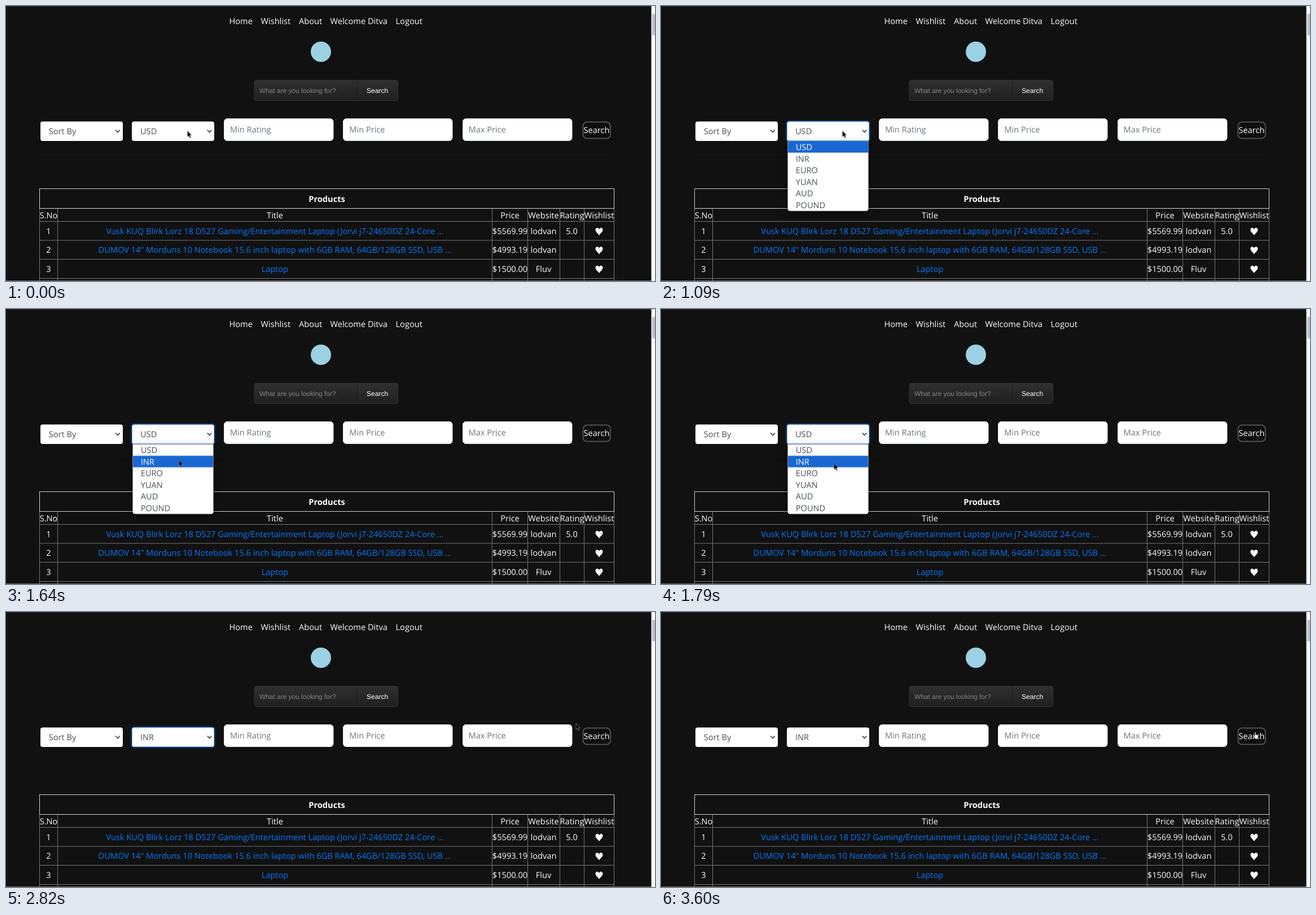
Recreate the animation shown at these times as an HTML page. Size 1150 by 487 pixels, loop 8 s.

```html
<!DOCTYPE html>
<html lang="en">
<head>
<meta charset="utf-8">
<title>Product search</title>
<style>
  html, body { margin: 0; width: 100%; height: 100%; overflow: hidden; background: #111; }
  svg { display: block; }
  text { font: 14.6px "Open Sans", sans-serif; fill: #fff; white-space: pre; text-rendering: geometricPrecision; }
  .mid text, text.mid { text-anchor: middle; }
  .bold { font-weight: 700; }
  .link { fill: #057aff; }
  .field { fill: #fff; }
  .hint rect { stroke: #dfe3e7; }
  .hint text { fill: #6c757d; }
  .value { fill: #495057; }
  .bar text { font-family: "Liberation Sans", Arial, sans-serif; font-size: 12.1px; }
  .bar .ask { font-size: 11.9px; fill: #858585; }
  .grid { fill: none; stroke: #777; }
  .head { fill: none; stroke: #d2d2d2; }

  /* Every change is a hard cut on an 8 s loop */
  .step { animation: 8s step-end infinite; }
  .menu { animation-name: menu; filter: drop-shadow(0 5px 7px rgba(0, 0, 0, .45)); }
  .menu text { fill: #495057; }
  .mark { fill: #1967d2; animation-name: mark; }
  .menu .usd { animation-name: usd; }
  .menu .inr { animation-name: inr; }
  .before { animation-name: before; }
  .after { animation-name: after; }
  .focus { animation-name: focus; }
  .arrow { animation-name: arrow; }
  .beam { animation-name: beam; }
  .hand { animation-name: hand; }

  @keyframes menu {
    0%, 29.625% { visibility: hidden; }
    11.75% { visibility: visible; }
    100% { visibility: hidden; }
  }
  @keyframes mark {
    0% { transform: none; }
    20.5%, 100% { transform: translateY(20.6px); }
  }
  @keyframes usd {
    0% { fill: #fff; }
    20.5%, 100% { fill: #495057; }
  }
  @keyframes inr {
    0% { fill: #495057; }
    20.5%, 100% { fill: #fff; }
  }
  @keyframes before {
    0% { opacity: 1; }
    29.625%, 100% { opacity: 0; }
  }
  @keyframes after {
    0% { opacity: 0; }
    29.625%, 100% { opacity: 1; }
  }
  @keyframes focus {
    0% { opacity: 0; }
    13.625% { opacity: 1; }
    43.5% { opacity: .5; }
    45%, 100% { opacity: 0; }
  }
  @keyframes arrow {
    0% { transform: translate(321.5px, 221px); opacity: 1; }
    19% { transform: translate(306.5px, 251.5px); opacity: 1; }
    20.5% { transform: translate(306.5px, 267.5px); opacity: 1; }
    22.375% { transform: translate(306.5px, 273.5px); opacity: 1; }
    31.5% { transform: translate(419.5px, 275.5px); opacity: 1; }
    33.375% { opacity: 0; }
    35.25% { transform: translate(1010px, 197px); opacity: 1; }
    36.75%, 100% { opacity: 0; }
  }
  @keyframes beam {
    0%, 35.25%, 100% { opacity: 0; }
    33.375% { opacity: 1; }
  }
  @keyframes hand {
    0% { opacity: 0; }
    36.75% { transform: translate(1037px, 206px); opacity: 1; }
    38.25% { transform: translate(1046px, 210px); opacity: 1; }
    39.75%, 100% { transform: translate(1049.5px, 212px); opacity: 1; }
  }
</style>
</head>
<body>
<svg width="1150" height="487" viewBox="0 0 1150 487">
  <defs>
    <linearGradient id="shade" x2="0" y2="1">
      <stop stop-color="#303030"/>
      <stop offset="1" stop-color="#1f1f1f"/>
    </linearGradient>
    <path id="chevron" d="M-3.8-2 0 2 3.8-2" fill="none" stroke="#343a40" stroke-width="1.6"/>
    <path id="heart" fill="#fff" d="M0 7.2C-1.500 4-6.500 1.500-6.500-2.700C-6.500-7.200-1.200-7.400 0-3.800C1.200-7.400 6.500-7.200 6.500-2.700C6.500 1.500 1.500 4 0 7.200Z"/>
  </defs>

  <rect width="1150" height="487" fill="#111"/>
  <path d="M0 .5H1144" stroke="#2e2e2e"/>
  <path d="M0 486.5H1144" stroke="#666"/>
  <rect x="1143.500" width="6.500" height="487" fill="#fafafa"/>
  <rect x="1145" y="14" width="5" height="38" fill="#c1c1c1"/>

  <g class="nav">
    <text x="395.500" y="32">Home</text>
    <text x="451.500" y="32">Wishlist</text>
    <text x="519" y="32">About</text>
    <text x="574.500" y="32">Welcome Ditva</text>
    <text x="690.500" y="32">Logout</text>
  </g>

  <circle cx="558" cy="81" r="18" fill="#9bd1e2"/>

  <g class="bar">
    <rect x="440" y="131.500" width="254.500" height="36" rx="4" fill="url(#shade)" stroke="#353535"/>
    <path d="M622.500 132V167" stroke="#1c1c1c"/>
    <text class="ask" x="449" y="153.500">What are you looking for?</text>
    <text class="mid" x="658.200" y="154.300">Search</text>
  </g>

  <rect class="field" x="61" y="204.500" width="146" height="34.500" rx="4"/>
  <text class="value" x="75.800" y="227.300">Sort By</text>
  <use href="#chevron" x="198" y="221.500"/>

  <rect class="step focus" x="220.500" y="202" width="151" height="39.500" rx="6" fill="#0d2c4d"/>
  <rect class="field" x="223" y="204.500" width="146" height="34.500" rx="4"/>
  <rect class="step focus" x="223.500" y="205" width="145" height="33.500" rx="3.500" fill="none" stroke="#80bdff"/>
  <text class="value step before" x="238" y="227.300">USD</text>
  <text class="value step after" x="238" y="227.300">INR</text>
  <use href="#chevron" x="360.500" y="221.500"/>

  <g class="hint">
    <rect class="field" x="386.500" y="199.500" width="193.500" height="39" rx="5.500"/>
    <rect class="field" x="597.500" y="199.500" width="193.500" height="39" rx="5.500"/>
    <rect class="field" x="809.500" y="199.500" width="193.500" height="39" rx="5.500"/>
    <text x="397" y="224.300">Min Rating</text>
    <text x="608.300" y="224.300">Min Price</text>
    <text x="819.500" y="224.300">Max Price</text>
  </g>

  <rect x="1022.500" y="205.500" width="48.500" height="29" rx="7" fill="#0e0e0e" stroke="#505050" stroke-width="2"/>
  <text class="mid" x="1046.500" y="224.500">Search</text>

  <path d="M61 268.500H1072" stroke="#0b0b0b"/>

  <path class="grid" d="M59.500 359V487M91.500 359V487M861.500 359V487M924.500 359V487M981.500 359V487M1024.500 359V487M1077.500 359V487
    M59.500 381.500H1078M59.500 415H1078M59.500 448.500H1078M59.500 482.500H1078"/>
  <rect class="head" x="59.500" y="323.500" width="1018" height="35"/>

  <g class="mid">
    <text class="bold" x="568.500" y="346.500">Products</text>

    <text x="75.500" y="375.500">S.No</text>
    <text x="476.500" y="375.500">Title</text>
    <text x="893" y="375.500">Price</text>
    <text x="952.500" y="375.500">Website</text>
    <text x="1003" y="375.500">Rating</text>
    <text x="1051" y="375.500">Wishlist</text>

    <text x="75.500" y="403.500">1</text>
    <text class="link" x="476.500" y="403.500">Vusk KUQ Blirk Lorz 18 D527 Gaming/Entertainment Laptop (Jorvi j7-24650DZ 24-Core ...</text>
    <text x="893" y="403.500">$5569.99</text>
    <text x="952.500" y="403.500">lodvan</text>
    <text x="1002.500" y="403.500">5.0</text>

    <text x="75.500" y="437">2</text>
    <text class="link" x="476.500" y="437">DUMOV 14" Morduns 10 Notebook 15.6 inch laptop with 6GB RAM, 64GB/128GB SSD, USB ...</text>
    <text x="893" y="437">$4993.19</text>
    <text x="952.500" y="437">lodvan</text>

    <text x="75.500" y="470.500">3</text>
    <text class="link" x="476.500" y="470.500">Laptop</text>
    <text x="893" y="470.500">$1500.00</text>
    <text x="952.500" y="470.500">Fluv</text>
  </g>
  <use href="#heart" x="1051" y="399"/>
  <use href="#heart" x="1051" y="432.500"/>
  <use href="#heart" x="1051" y="466"/>

  <g class="step menu">
    <path d="M224.500 239.500H367.500V358.500Q367.500 363 363 363H229Q224.500 363 224.500 358.500Z" fill="#fff" stroke="#8a8a8a" stroke-width=".8"/>
    <rect class="step mark" x="225" y="239.300" width="142.300" height="20.400"/>
    <text class="step usd" x="238.800" y="255">USD</text>
    <text class="step inr" x="238.800" y="275.600">INR</text>
    <text x="238.800" y="296.200">EURO</text>
    <text x="238.800" y="316.800">YUAN</text>
    <text x="238.800" y="337.400">AUD</text>
    <text x="238.800" y="358">POUND</text>
  </g>

  <path class="step arrow" d="M0 0V11L2.500 8.700 4.300 12.700 6 12 4.200 8H7.300Z" fill="#000" stroke="#aaa" stroke-width=".6"/>
  <path class="step beam" d="M981.500 206H983.500L984 206.500 984.500 206H986.500M984 206.500V219.500M981.500 220H986.500" fill="none" stroke="#111"/>
  <path class="step hand" d="M2.500 1Q3.500 0 4.500 1V5L8 6Q9 6.500 9 8V9.500L8 13H3.500L0 8.500Q0 7 1.300 7.500L2.500 8.500Z" fill="#fff" stroke="#111" stroke-width=".8"/>
</svg>
</body>
</html>
```
